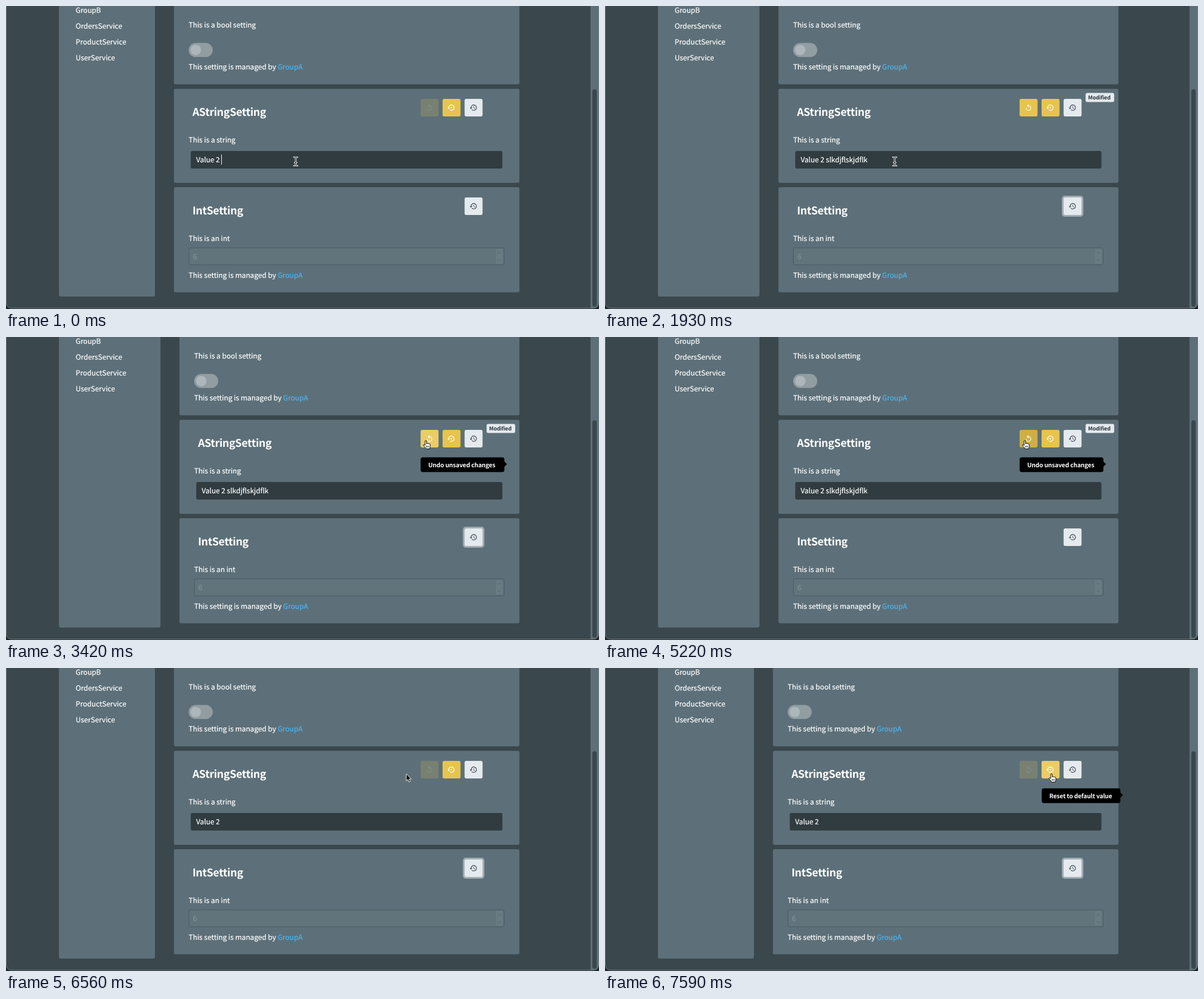
Animation, 1047 px wide and 535 px high, one loop 8000 ms. Source, as an HTML page:

```html
<!DOCTYPE html>
<html lang="en">
<head>
<meta charset="utf-8">
<title>Settings editor</title>
<style>
  html, body { margin: 0; width: 100%; height: 100%; overflow: hidden; background: #20272a; }
  svg { display: block; width: 100vw; height: 100vh; }
  text {
    font: 12.55px "Noto Sans CJK JP", "Noto Sans CJK SC", "Noto Sans CJK", sans-serif;
    fill: #fff; stroke: #fff; stroke-width: .22px;
    white-space: pre; text-rendering: geometricPrecision;
  }
  .title { font-size: 18.8px; font-weight: 700; letter-spacing: -.36px; stroke: none; }
  .tip { font-size: 10.74px; font-weight: 700; letter-spacing: -.16px; stroke: none; }
  .badge { font-size: 9.4px; font-weight: 700; letter-spacing: -.12px; fill: #26333a; stroke: none; }
  .link { fill: #4ab5f2; stroke: #4ab5f2; }
  .muted { fill: #82929a; stroke: #82929a; }
</style>
</head>
<body>
<svg id="stage" viewBox="0 0 1047 535"></svg>
<script>
const LOOP = 8000;
const BG = '#3a474c', PANEL = '#5d7079', LIGHT = '#e5eaee', YELLOW = '#e6c44e', HOVER = '#ebcd67', PRESSED = '#ceae45';
const stage = document.getElementById('stage');

// Each track is a list of [start time, value]; a value holds until the next one.
const TYPED = [[0, ''], [150, 'slkd'], [300, 'slkdjf'], [440, 'slkdjflsk'], [590, 'slkdjflskjdfl'],
  [740, 'slkdjflskjdflk'], [5370, null]];
const CARET = [[0, 1], [1190, 0], [1640, 1], [1930, 0]];
const SPELLING = [[0, 0], [1780, 1], [1930, 0]];
const MODIFIED = [[0, 0], [1930, 1], [5370, 0]];
const FOCUS_RING = [[0, 0], [1930, 1], [5220, 0], [5370, 1]];
const UNDO_FILL = [[0, YELLOW], [3420, HOVER], [5220, PRESSED], [5370, YELLOW]];
const RESET_FILL = [[0, YELLOW], [7440, HOVER]];
const TOOLTIP = [[0, null], [3420, [732, 148, 'Undo unsaved changes']], [5370, null],
  [7440, [771, 139, 'Reset to default value']]];
const POINTER = [[0, ['beam', 507, 266]], [2830, ['arrow', 548, 253]], [2980, ['arrow', 596, 241]],
  [3120, ['arrow', 700, 210]], [3270, ['arrow', 733, 188]], [3420, ['hand', 736, 182]],
  [6560, ['arrow', 706, 186]], [6700, ['arrow', 549, 233]], [6850, ['arrow', 535, 237]],
  [7000, ['arrow', 659, 225]], [7150, ['arrow', 738, 207]], [7290, ['arrow', 769, 198]],
  [7440, ['arrow', 787, 186]], [7590, ['hand', 783, 186]]];

const ICONS = {
  undo: '<path d="M12 6a7 7 0 1 1-7 7" fill="none"/><path d="M12 1v10l-5-5z" stroke="none"/>',
  reset: `<path d="M4 12a8 8 0 1 1 3.2 6.4" fill="none"/><path d="M0 12h8l-4 4z" stroke="none"/>
    <circle cx="12" cy="12" r="2" stroke="none"/>`,
  history: `<path d="M5 12a8 8 0 1 1 2.34 5.66" fill="none"/><path d="M1 12h8l-4 4z" stroke="none"/>
    <path d="M12.75 8v4.6l3.9 2.3" fill="none" stroke-width="1.6"/>`
};

const BEAM = 'M1.5 1q3 0 3 2.5v10q0 2.5-3 2.5M7.5 1q-3 0-3 2.5v10q0 2.5 3 2.5M2.8 10.5h3.4';
const POINTERS = {
  beam: `<g fill="none"><path d="${BEAM}" stroke="#fff" stroke-width="2.6" stroke-linecap="round"/>
    <path d="${BEAM}" stroke="#1a1f21"/></g>`,
  arrow: `<path d="M.8 1v12.4l2.8-2.6 2 4.6 2.1-.9-2-4.5h3.9z" fill="#000" stroke="#fff"/>`,
  hand: `<path d="M4 9.4V2a1.3 1.3 0 0 1 2.6 0v4.4c.3-1 2.2-.9 2.4.3.4-.8 2-.7 2.2.4.5-.6 1.8-.4 1.8.9v3.4
    c0 1.6-1 2.2-1.2 4H5.6C5.2 13.6 2.6 12 1.2 9.8.2 8.2 1.8 7.4 2.8 8.4z" fill="#fff" stroke="#000"/>
    <path d="M6.3 10v3M8.2 10v3M10.1 10v3" stroke="#000" stroke-width=".8"/>`
};

const at = (track, t) => track.findLast(([start]) => start <= t)[1];
const text = (x, y, content, type = '') => `<text x="${x}" y="${y}" class="${type}">${content}</text>`;
const box = (left, top, right, bottom, fill, radius = 3, extra = '') =>
  `<rect x="${left}" y="${top}" width="${right - left}" height="${bottom - top}" rx="${radius}" fill="${fill}" ${extra}/>`;

function button(x, y, icon, fill, ink, opacity = 1) {
  return `<g opacity="${opacity}">${box(x, y, x + 31.7, y + 31, fill)}
    <g transform="translate(${x + 8.4} ${y + 8.3}) scale(.6)" fill="${ink}" stroke="${ink}" stroke-width="2">${ICONS[icon]}</g></g>`;
}

const managedBy = (x, y) => `<text x="${x}" y="${y}">This setting is managed by <tspan class="link">GroupA</tspan></text>`;

function tooltip([x, width, label]) {
  const right = x + width;
  return box(x, 212.5, right, 238.5, '#000', 4) +
    `<path d="M${right - .5} 219.5l5 5-5 5z"/>` + text(x + 13.5, 229.7, label, 'tip');
}

function frameAndSidebar(shift) {
  return `<rect x=".5" y="-20" width="1046" height="553.5" rx="9" fill="${BG}"/>
    <path d="M1032 0h14v525a8 8 0 0 1-8 8h-6z" fill="${PANEL}"/>
    ${box(1035.3, 147, 1043, 531, BG, 4)}
    <rect x=".5" y="-20" width="1046" height="553.5" rx="9" fill="none" stroke="#727e82"/>
    ${box(93.5, -10, 263 + shift, 513, PANEL)}` +
    ['GroupB', 'OrdersService', 'ProductService', 'UserService']
      .map((name, i) => text(123, 11.5 + i * 28.25, name)).join('');
}

function boolCard(left) {
  return box(left, -10, 906.5, 138.3, PANEL) +
    text(left + 26, 38, 'This is a bool setting') +
    box(left + 26, 65.3, left + 68.5, 90, '#929da2', 12.4) +
    `<circle cx="${left + 38.5}" cy="77.7" r="9.3" fill="#adb6ba"/>` +
    managedBy(left + 26, 112);
}

function stringCard(left, s) {
  return box(left, 146.2, 906.5, 312.3, PANEL) +
    text(left + 32.7, 194.3, 'AStringSetting', 'title') +
    button(732, 164, 'undo', s.undoFill, '#fff', s.modified ? 1 : .2) +
    button(770.8, 164, 'reset', s.resetFill, '#fff') +
    button(809.7, 164, 'history', LIGHT, '#38474e') +
    (s.modified ? box(848.5, 153.5, 899, 169.5, LIGHT) + text(853, 165.3, 'Modified', 'badge') : '') +
    text(left + 26, 241, 'This is a string') +
    box(left + 29.7, 256, 876.5, 287, '#313c40') +
    `<text id="value" x="${left + 39.2}" y="276.2" xml:space="preserve">Value 2${s.typed === null ? '' : ' ' + s.typed}</text>
    <path id="spelling" fill="none" stroke="#dd4a42" stroke-width="1.7" stroke-dasharray="2 1.4"/>
    <path id="caret" fill="none" stroke="#fff"/>`;
}

function intCard(left, focused) {
  const ring = focused ? box(806.7, 335, 844.5, 372, '#a1adb3', 5) : '';
  return box(left, 320, 906.5, 505.5, PANEL) +
    text(left + 32.7, 368.3, 'IntSetting', 'title') + ring +
    button(809.7, 338, 'history', LIGHT, '#38474e') +
    text(left + 26, 414.8, 'This is an int') +
    box(left + 26.5, 427, 879.5, 457, '#61737b', 3, 'stroke="#485960"') +
    text(left + 33.5, 446.9, '6', 'muted') +
    box(865, 429, 877, 455, '#687a82', 1) +
    '<path d="M868.5 437l2.5-2.5 2.5 2.5M868.5 447.5l2.5 2.5 2.5-2.5" fill="none" stroke="#4e6068"/>' +
    managedBy(left + 26, 479.5);
}

function draw(s) {
  const shift = s.modified ? 9.7 : 0, left = 296.5 + shift;
  const [kind, x, y] = s.pointer;
  stage.innerHTML = frameAndSidebar(shift) + boolCard(left) + stringCard(left, s) + intCard(left, s.focused) +
    (s.tooltip ? tooltip(s.tooltip) : '') + `<g transform="translate(${x} ${y})">${POINTERS[kind]}</g>`;

  const value = document.getElementById('value'), start = left + 39.2;
  const end = start + value.getComputedTextLength();
  if (s.caret) document.getElementById('caret').setAttribute('d', `M${Math.floor(end) + .5} 262.5v17.5`);
  if (s.spelling) {
    const wordStart = start + value.getSubStringLength(0, 8);
    document.getElementById('spelling').setAttribute('d', `M${wordStart} 278.6H${end}`);
  }
}

let drawn = '';
function tick() {
  const t = performance.now() % LOOP;
  const state = {
    typed: at(TYPED, t), caret: at(CARET, t), spelling: at(SPELLING, t), modified: at(MODIFIED, t),
    focused: at(FOCUS_RING, t), undoFill: at(UNDO_FILL, t), resetFill: at(RESET_FILL, t),
    tooltip: at(TOOLTIP, t), pointer: at(POINTER, t)
  };
  const key = JSON.stringify(state);
  if (key !== drawn) {
    draw(state);
    drawn = key;
  }
  requestAnimationFrame(tick);
}
tick();
</script>
</body>
</html>
```
